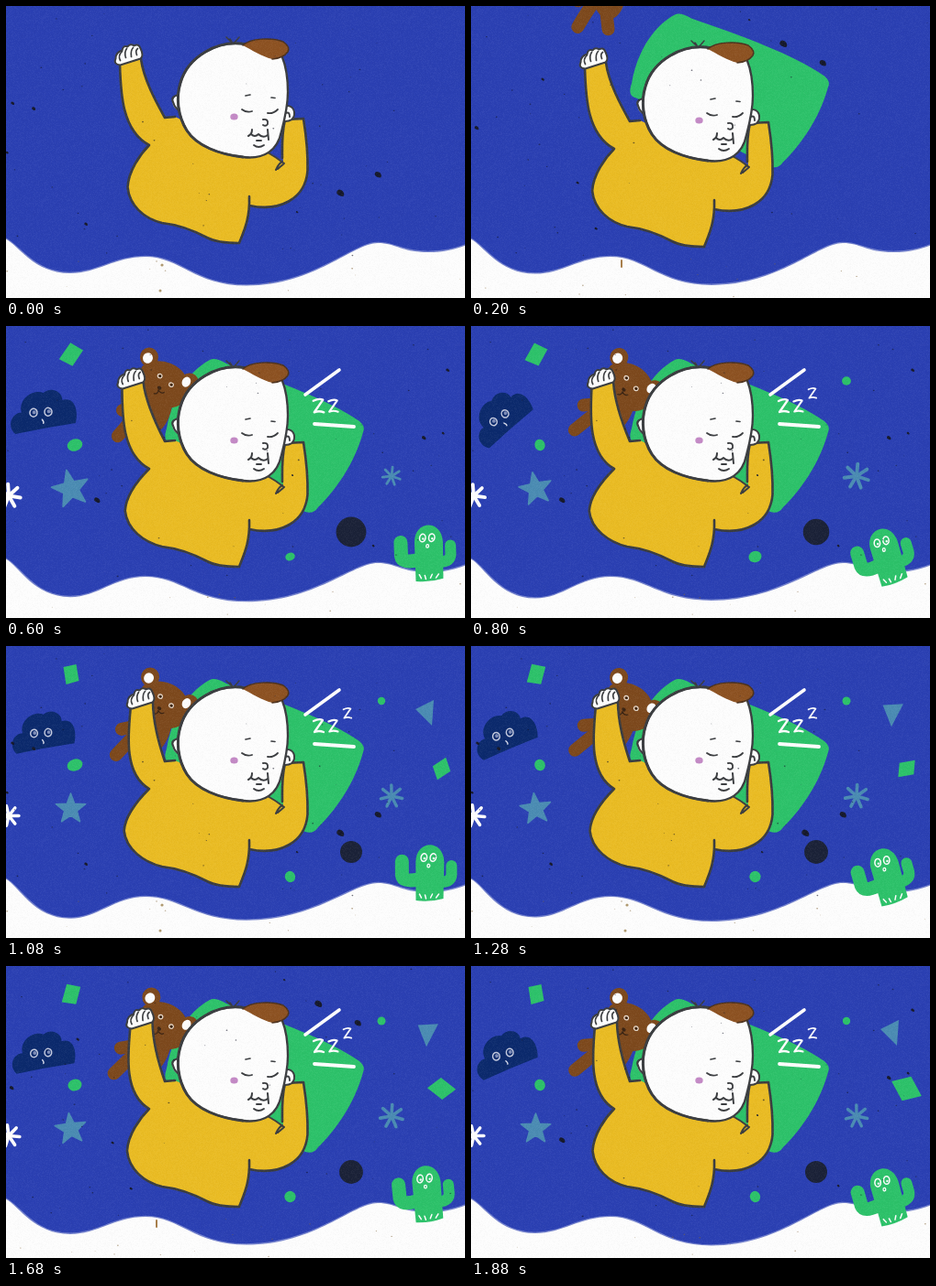
An HTML page with a canvas for the animation above (1.92 s loop, 500 by 319 pixels).

```html
<!DOCTYPE html>
<html lang="en">
<head>
<meta charset="utf-8">
<title>Sleeping baby</title>
<style>
  html, body { margin: 0; width: 100%; height: 100%; overflow: hidden; background: #2b40b3; }
  canvas { display: block; width: 100vw; height: 100vh; }
</style>
</head>
<body>
<canvas id="stage" width="500" height="319"></canvas>
<script>
const ctx = document.getElementById('stage').getContext('2d');
const LOOP = 1920, STEP = 40;
const C = {
  sky: '#2b40b3', snow: '#fdfdfd', green: '#2dc26a', yellow: '#eabc24', brown: '#7d491d', hair: '#8d5222',
  ink: '#3b3d40', navy: '#0c2a6d', teal: '#4b8cb3', ball: '#1b2238', pink: '#c48ac6'
};

const clamp = p => Math.max(0, Math.min(1, p));
const span = (t, a, b) => clamp((t - a) / (b - a));
const smooth = p => p * p * (3 - 2 * p);
const back = p => 1 + 2.7 * (p - 1) ** 3 + 1.7 * (p - 1) ** 2;
// swings between 0 and 1, reaching 1 at the peak time
const sway = (t, period, peak) => 0.5 + 0.5 * Math.cos(2 * Math.PI * (t - peak) / period);

function random(seed) {
  return () => (seed = (seed * 16807) % 2147483647) / 2147483647;
}
function fill(d, color) {
  ctx.fillStyle = color;
  ctx.fill(new Path2D(d));
}
function line(d, color = C.ink, width = 2) {
  ctx.strokeStyle = color;
  ctx.lineWidth = width;
  ctx.stroke(new Path2D(d));
}
function dot(x, y, rx, color, ry = rx, rot = 0) {
  ctx.fillStyle = color;
  ctx.beginPath();
  ctx.ellipse(x, y, rx, ry, rot, 0, 7);
  ctx.fill();
}
function ring(x, y, rx, ry, color, width) {
  ctx.strokeStyle = color;
  ctx.lineWidth = width;
  ctx.beginPath();
  ctx.ellipse(x, y, rx, ry, 0.2, 0, 7);
  ctx.stroke();
}
// draws around a pivot: moved, turned in degrees and scaled
function place(x, y, deg, scale, draw) {
  if (scale <= 0) return;
  ctx.save();
  ctx.translate(x, y);
  ctx.rotate(deg * Math.PI / 180);
  ctx.scale(scale, scale);
  draw();
  ctx.restore();
}
const pop = (t, start) => t < start ? 0 : back(span(t, start - 40, start + 160));

function makeGrain() {
  const tile = document.createElement('canvas');
  tile.width = tile.height = 200;
  const g = tile.getContext('2d'), r = random(77);
  const img = g.createImageData(200, 200);
  for (let i = 0; i < img.data.length; i += 4) {
    const tone = r() < 0.5 ? 0 : 255;
    img.data[i] = img.data[i + 1] = img.data[i + 2] = tone;
    img.data[i + 3] = r() * (tone ? 10 : 5);
  }
  g.putImageData(img, 0, 0);
  return ctx.createPattern(tile, 'repeat');
}
const grain = makeGrain();

const bigSpecks = [
  [[405, 184, 3.4], [364, 204, 3.8], [87, 238, 1.8], [7, 106, 1.8], [30, 112, 2], [1, 160, 1.5], [317, 225, 1.2]],
  [[340, 41, 3.8], [383, 62, 3.4], [6, 133, 2.2], [78, 80, 1.6], [116, 193, 1.5], [136, 243, 1.5], [303, 15, 1.2]],
  [[99, 190, 3], [455, 122, 2.2], [481, 48, 1.8], [476, 117, 1.4], [400, 240, 1.3], [312, 163, 1]]
];
function specks(set) {
  const r = random(311 + set * 97);
  for (let i = 0; i < 60; i++) {
    const x = r() * 500, y = r() * 319, size = 0.4 + r() * 0.6;
    dot(x, y, size, y > 275 ? 'rgba(125,95,50,.55)' : 'rgba(20,22,40,.6)', size * 0.8);
  }
  for (const [x, y, size] of bigSpecks[set]) {
    dot(x, y, size, '#171a2c', size * 0.8, 0.5);
    dot(x + size * 0.6, y + size * 0.5, size * 0.55, '#171a2c');
  }
  if (set === 1) line('M164,278V285', '#a07238', 1.8);
  if (set === 0) { dot(170, 283, 1.6, '#b09a70'); dot(168, 311, 1.5, '#b09a70'); }
}

function ground(wave) {
  const a = 295 - 3 * wave, b = 302.5 + 3 * wave;
  const top = `M-2,254 C12,258 28,${a} 70,${a} C100,${a} 118,274 152,274 C190,274 205,${b} 262,${b}
    C336,${b} 378,259 405,259 C425,259 430,269 460,269 C480,269 490,265 502,261`;
  line(top, 'rgba(253,253,253,.35)', 2.6);
  fill(top + ' V320H-2Z', C.snow);
}

function pillow(t) {
  if (t < 80) return;
  const dy = -210 * (1 - span(t, 40, 365)) ** 3;
  place(0, dy, 0, 1, () => fill(`M222,37 C203,47 182,72 175,112 Q170,126 180,128 L326,203 Q335,206 340,198
    C358,181 380,150 389,116 Q392,110 385,104 C350,80 300,62 240,41 Q228,34 222,37Z`, C.green));
}

function snore(t) {
  if (t >= 280) line('M326,75 L' + (326 + 37 * span(t, 240, 340)) + ',' + (75 - 27 * span(t, 240, 340)), C.snow, 3.6);
  if (t >= 320) line('M336,107 L' + (336 + 43 * span(t, 280, 360)) + ',110', C.snow, 3.8);
  [[340, 88, 1, 480], [356, 88, 0.92, 560], [371.5, 74, 0.78, 640]].forEach(([x, y, size, start]) =>
    place(x, y, 0, size * pop(t, start), () => line('M-5,-6 Q1,-9 5,-7 L-4,6 Q1,4 6,6', C.snow, 2.3)));
}

function bear(t) {
  if (t < 160) return;
  const up = 1 - span(t, 120, 360), held = smooth(span(t, 400, 800));
  const deg = (-5 - 10 * up) * (1 - held) + 8 * sway(t, 520, 800) * held;
  place(156 - 23 * up, 65 - 230 * up * up, deg, 1, () => {
    ctx.translate(-155, -65);
    line('M148,86 L125,91', C.brown, 14);
    line('M148,90 Q132,104 119,119', C.brown, 14);
    line('M154,95 L151,128', C.brown, 14);
    fill('M150,62 C136,80 138,108 152,118 C164,120 176,108 180,84Z', C.brown);
    dot(156, 34, 10, C.brown, 10.5);
    dot(199, 62, 9.5, C.brown, 9);
    fill('M148,44 C156,36 178,36 191,50 C204,66 200,84 184,89 C166,94 150,84 147,68 C145,58 144,50 148,44Z', C.brown);
    dot(154.5, 35, 5.4, C.snow, 5.8, 0.4);
    dot(195.5, 62.5, 4.6, C.snow, 5.8, 0.5);
    for (const [x, y] of [[167, 55], [179, 65]]) {
      ring(x, y, 2.4, 2.2, '#e8ddd2', 1.2);
      dot(x + 0.3, y + 0.2, 1.2, '#2b2018');
    }
    dot(166, 68, 2.4, '#3b2413', 1.8, 0.6);
    line('M165,70 Q164,75 160,74 M165,71 Q168,75 171,73', '#3b2413', 1.2);
  });
}

function baby(t, wave) {
  const h = 13 * smooth(span(t, 400, 1080)) - smooth(span(t, 1500, 1880));
  const b = 130.5 + 2 * wave;
  const dy = -4 * (1 - span(t, 0, 160)) ** 2;
  ctx.save();
  ctx.translate(0, dy);

  const outer = `M${124 + h * 0.9},68 C${125 + h * 0.6},98 ${126 + h * 0.2},140 156,156
    C146,166 ${b + 1},184 ${b},202 C${b + 2},222 150,236 170,241 C188,243 204,249 219,257 Q230,263 254,263
    C258,252 266,238 265,212 L265,222 C298,229 326,215 328.5,184 C329,166 327,146 324,127 L304,128`;
  const inner = `M${147 + h},62 C${150 + h * 0.8},84 ${163 + h * 0.3},108 173,126 L184,125`;
  fill(outer + ` C300,145 301,160 302,174 L286,164 L240,150 L184,125 L173,126
    C${163 + h * 0.3},108 ${150 + h * 0.8},84 ${147 + h},62Z`, C.yellow);
  line(outer + ' C300,145 301,160 301,170', C.ink, 2.6);
  line(inner, C.ink, 2.6);
  line('M285,164 Q294,169 303,176 M294,183 Q297,176 301,174 M296,182 L303,176', C.ink, 2);

  place(134.5 + h, 58.5, 0, 1, () => {
    const fist = 'M-10,10 Q-18,9 -15,3 Q-15,-4 -8,-6 Q-7,-12 -2,-10 Q1,-14 5,-11 Q10,-14 12,-8 Q16,0 12,3Z';
    fill(fist, C.snow);
    line(fist, C.ink, 2);
    line('M-10,5 Q-13,0 -8,-5 M-4,2 Q-6,-4 -3,-8 M2,1 Q1,-6 4,-9 M8,-1 Q6,-6 9,-8', C.ink, 1.7);
  });

  // ears
  const ear = 'M303,116 C306,110 315,114 314,123 Q313,130 304,130';
  fill(ear + 'Z', C.snow);
  line(ear + ' M305,121 Q309,119 309,125', C.ink, 1.9);
  fill('M189,101 C179,102 179,116 189,118Z', C.snow);
  line('M188,101 Q179,103 182,109 Q184,116 189,118', C.ink, 2.2);

  const left = 'M262,46 C230,40 198,60 190,88 C185,104 187,124 197,140 C208,157 232,166 258,169';
  const right = 'C282,172 296,161 300,141 C304,126 307,112 307,98 C307,82 305,70 301,60';
  fill(left + right + 'Z', C.snow);
  line(left + right, C.ink, 2.3);
  line(left, C.ink, 3);
  fill('M258,47 C266,39 290,38 302,43 Q310,49 307,54 Q302,61 290,62 C278,59 268,52 258,47Z', C.hair);
  line('M258,47 C266,39 290,38 302,43 Q310,49 307,54 Q302,61 290,62', '#4d321e', 1.5);
  line('M240,38 L247,45 M254,38 L248,45 M246,43 L244,40', C.ink, 1.5);

  // face
  dot(248.5, 125, 4.2, C.pink, 3.6);
  line('M261,102 L266,101 M289,104 L293,104.5', C.ink, 1.7);
  line('M257,117 Q262,121 268,119 M285,121 Q291,122 296,117', C.ink, 1.8);
  line('M280,128 Q286,127 285,133 Q283,136 280,134', C.ink, 1.9);
  line('M268,139 Q268,144 264,146 M267,144 Q271,148 275,144 Q280,149 285,145 M285,139 L286,150', C.ink, 2);
  line('M270,156 Q275,160 281,156 M273,151 L278,151', C.ink, 1.9);
  ctx.restore();
}

function cloud(t) {
  place(44, 111, -36 * sway(t, 600, 840), 0.96 * pop(t, 480), () => {
    ctx.translate(-3, -14);
    fill('M-31,19 C-40,10 -34,-4 -23,-4 C-26,-18 -10,-29 2,-24 C12,-31 23,-23 22,-15 C36,-18 39,-2 35,11 Q2,14 -31,19Z', C.navy);
    for (const x of [-10, 6]) {
      ring(x, -3, 4, 4.4, '#c3c9de', 1.5);
      dot(x + 0.8, -3.4, 2, '#7d8cb8');
    }
    line('M-1,5 Q1,8 0,9', '#d8dcec', 1.5);
  });
}

function cactus(t) {
  place(470, 278, -17 * sway(t, 520, 800), pop(t, 440), () => {
    ctx.translate(-8.5, 0);
    fill('M-15,0 L-15,-42 C-15,-66 15,-68 16,-42 L15,-2 Q0,2 -15,0Z', C.green);
    line('M-30,-43 L-30,-28 Q-29,-20 -13,-23', C.green, 15);
    line('M24,-38 L24,-28 Q23,-20 12,-20', C.green, 12);
    for (const x of [-6, 4]) {
      ring(x, -47, 3.2, 4.3, C.snow, 1.5);
      dot(x + 0.5, -46, 1.2, C.snow);
    }
    ring(-1, -38, 1.4, 1.8, C.snow, 1.3);
    line('M-11,-7 L-9,-3 M-5,-6 L-4,-2 M1,-3 L3,-7 M7,-3 L10,-7', C.snow, 1.5);
  });
}

function star(radius, color) {
  let d = '';
  for (let i = 0; i < 10; i++) {
    const a = i * Math.PI / 5 - Math.PI / 2, r = i % 2 ? radius * 0.42 : radius;
    d += (i ? 'L' : 'M') + Math.cos(a) * r + ',' + Math.sin(a) * r;
  }
  fill(d + 'Z', color);
  line(d + 'Z', color, 1.5);
}
function flake(radius, arms, color) {
  for (let i = 0; i < arms; i++) {
    const a = i * 2 * Math.PI / arms;
    line(`M0,0L${Math.cos(a) * radius},${Math.sin(a) * radius}`, color, 3.4);
  }
}

function toys(t) {
  const u = sway(t, 800, 680), q = sway(t, 520, 800);
  cloud(t);
  cactus(t);
  place(70.5, 31, 48 * u, pop(t, 440) * (1 + 0.15 * u), () => fill('M-8,-8 L6,-11 L9,7 L-5,11Z', C.green));
  place(70.5, 178, -14 * u, pop(t, 520) * (1 + 0.15 * u * u), () => star(17, C.teal));
  place(3, 185.5, 10 * u, pop(t, 560) * (1 + 0.15 * u), () => flake(11, 7, C.snow));
  place(420, 164, 12 + 8 * u, pop(t, 600) * (1 + 0.2 * u * u), () => flake(12, 7, C.teal));
  place(376, 225, 0, pop(t, 520) * (1 + 0.3 * u * u), () => dot(0, 0, 12, C.ball));
  place(75, 130, -18, pop(t, 560), () => dot(0, 0, 5.6 + 3 * (1 - q), C.green, 6.4));
  place(309.5, 252, -20, pop(t, 600), () => dot(0, 0, 5.6 + 2.4 * u * u, C.green, 6.2));
  place(409, 60, 0, pop(t, 640), () => dot(0, 0, 4.2 + 1.2 * u * u, C.green, 4.2 + 0.6 * u));
  place(458, 73, 47 * u, pop(t, 840), () => fill('M8,-14 L-12,-4 L6,14Z', C.teal));
  place(474.5, 134, -69 + 0.119 * (t - 1080), pop(t, 880) * (1 + 0.4 * smooth(span(t, 1480, 1880))),
    () => fill('M-13,0 L-1,-10 L13,0 L1,10Z', C.green));
}

function draw(t) {
  const wave = Math.cos(2 * Math.PI * t / LOOP);
  const set = Math.floor((t / STEP + 5) / 10) % 3;
  ctx.fillStyle = C.sky;
  ctx.fillRect(0, 0, 500, 319);
  ctx.lineCap = ctx.lineJoin = 'round';
  ground(wave);
  pillow(t);
  snore(t);
  bear(t);
  baby(t, wave);
  toys(t);
  specks(set);
  ctx.save();
  ctx.translate(-set * 61, -set * 37);
  ctx.fillStyle = grain;
  ctx.fillRect(0, 0, 700, 500);
  ctx.restore();
}

const begin = performance.now();
let shown = -1;
function tick() {
  const t = Math.floor(((performance.now() - begin) % LOOP) / STEP) * STEP;
  if (t !== shown) draw(shown = t);
  requestAnimationFrame(tick);
}
tick();
</script>
</body>
</html>
```
